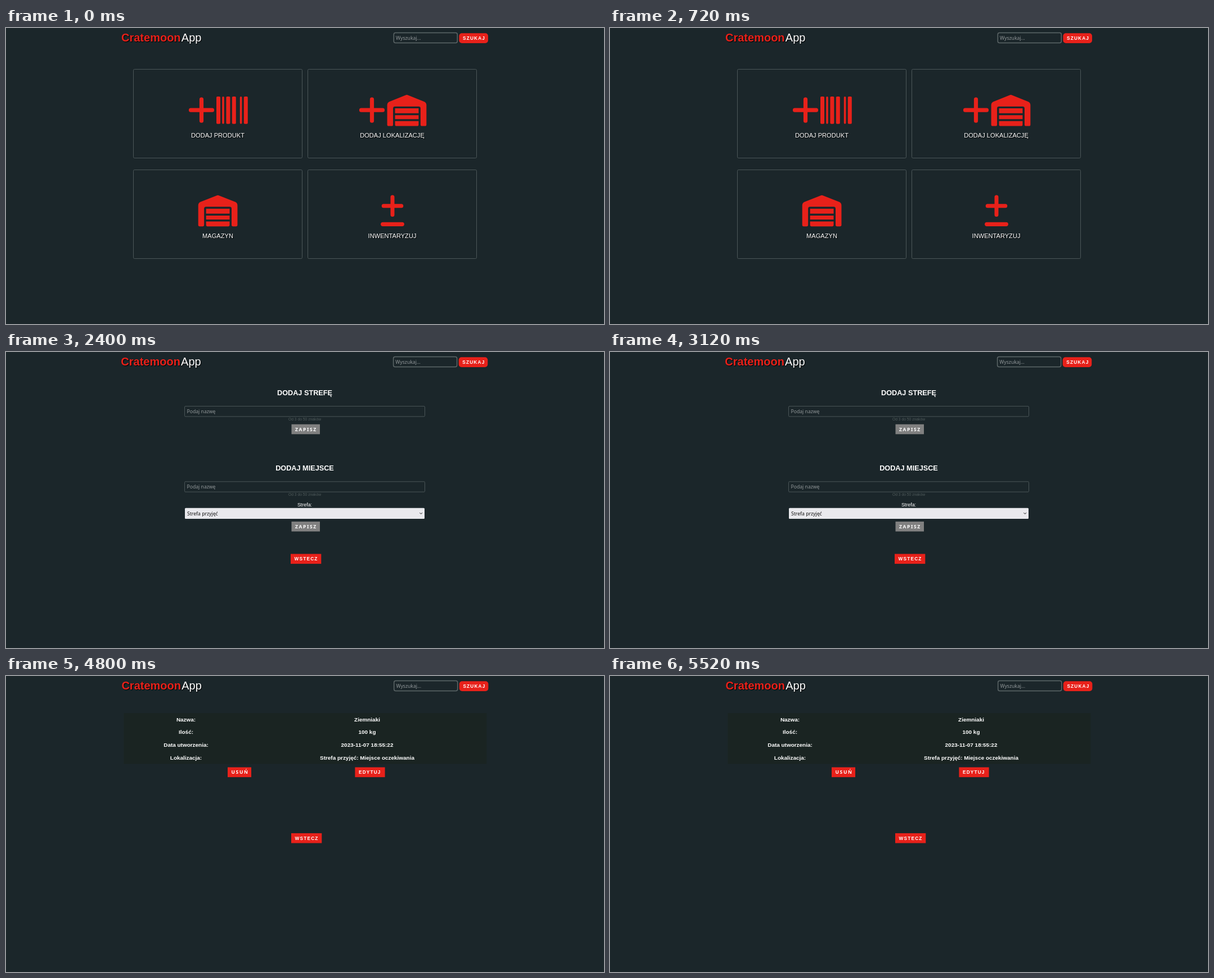
Write an HTML page that moves like this. It is 1063x527 px and loops after 6 s.

```html
<!DOCTYPE html>
<html lang="pl">
<head>
<meta charset="utf-8">
<title>Magazyn</title>
<style>
  html, body { margin: 0; width: 100%; height: 100%; overflow: hidden; background: #1b262a; }
  svg { display: block; width: 1063px; height: 527px; }
  text { font-family: "Liberation Sans", Arial, sans-serif; fill: #fff; white-space: pre; }
  .ui { font-family: "Noto Sans", Tahoma, sans-serif; }
  .bold { font-weight: bold; }
  .shadow { text-shadow: 1px 1px 1px #000; }
  .box { fill: none; stroke: #4b5658; }
</style>
</head>
<body>
<svg id="stage" viewBox="0 0 1063 527"></svg>
<script>
const RED = '#e8211a', GREY = '#808080', FAINT = '#3d4648', HINT = '#505b5c', PLACEHOLDER = '#92989a';
const SCENE_MS = 1200;

const text = (x, y, size, str, { cls = '', fill = '#fff', anchor = 'start', spacing = 0 } = {}) =>
  `<text x="${x}" y="${y}" class="${cls}" text-anchor="${anchor}"
    style="font-size:${size}px;fill:${fill};letter-spacing:${spacing}px">${str}</text>`;
const centered = (x, y, size, str, opts) => text(x, y, size, str, { anchor: 'middle', ...opts });
const heading = (x, y, str, size = 11.1, fill) => centered(x, y, size, str, { cls: 'bold', fill });
const label = (x, y, str, fill) => text(x, y, 8.9, str, { fill });
const uiText = (x, y, str, fill = PLACEHOLDER) => text(x, y, 8.65, str, { cls: 'ui', fill });

const rect = (x, y, w, h, fill, r = 0) =>
  `<rect x="${x}" y="${y}" width="${w}" height="${h}" rx="${r}" fill="${fill}"/>`;
const box = (x, y, w, h, r = 1.5) =>
  `<rect class="box" x="${x}" y="${y}" width="${w}" height="${h}" rx="${r}"/>`;
const field = (x, y, w, str, fill) => box(x, y, w, 18.3) + uiText(x + 4, y + 12.6, str, fill);
const stroke = (d, width, color) =>
  `<path d="${d}" fill="none" stroke="${color}" stroke-width="${width}" stroke-linecap="round"/>`;

function button(x, y, w, str, { fill = RED, color = '#fff', r = 0, ui = false } = {}) {
  return rect(x, y, w, 17.6, fill, r) + text(x + 6.6, y + 11.8, ui ? 8.5 : 8.3, str,
    { cls: ui ? 'ui bold' : 'bold', fill: color, spacing: ui ? 1.6 : 1.15 });
}
const save = (x, y, fill = GREY, color = '#fff') => button(x, y, 50.5, 'ZAPISZ', { fill, color, ui: true });
const back = (x, y) => button(x, y, 54.3, 'WSTECZ');

function select(x, y, w, h, str, fill, ink) {
  const cx = x + w - 6.3, cy = y + h / 2;
  return rect(x, y, w, h, fill, 1.5) + uiText(x + 4, cy + 3.2, str, ink) +
    stroke(`M${cx - 2} ${cy - 1}l2 2l2 -2`, 1, ink);
}

const plus = (x, y, arm, width = 7.2) =>
  stroke(`M${x - arm} ${y}h${2 * arm}M${x} ${y - arm}v${2 * arm}`, width, RED);
const bars = (x, y) => [[0, 7], [10.2, 3.6], [17.4, 7], [27.8, 7], [41.8, 3.6], [48.8, 7]]
  .map(([dx, w]) => rect(x + dx, y, w, 48.7, RED, 1.8)).join('');
const garage = (x, y) => `<path fill="${RED}" transform="translate(${x} ${y}) scale(.109)" d="
  M0 488V171Q0 128 40 112L308 5Q320 0 332 5L600 112Q640 128 640 171V488Q640 512 616 512H568Q544 512 544 488
  V224Q544 192 512 192H128Q96 192 96 224V488Q96 512 72 512H24Q0 512 0 488Z
  M128 224H512V304H128ZM128 336H512V400H128ZM128 432H512V488Q512 512 488 512H152Q128 512 128 488Z"/>`;

const card = (x, y, str, icon) => box(x, y, 300, 158, 2) + icon +
  centered(x + 150, y + 121.5, 11.1, str, { cls: 'shadow' });

const header = (dx, dy) => `<g transform="translate(${dx} ${dy})">` +
  text(205, 24, 20, 'Cratemoon', { cls: 'bold shadow', fill: RED }) +
  text(311.8, 24, 20, 'App', { cls: 'shadow' }) +
  '<rect x="689.3" y="8.6" width="113" height="18" rx="3" fill="none" stroke="#5d6768" stroke-width="1.5"/>' +
  uiText(693, 21, 'Wyszukaj...') +
  button(805.4, 9.3, 51.6, 'SZUKAJ', { r: 5 }) + '</g>';

const home = () => header(0, 0) +
  card(226.5, 73.5, 'DODAJ PRODUKT', plus(347.5, 146.2, 19) + bars(374, 122)) +
  card(536.5, 73.5, 'DODAJ LOKALIZACJĘ', plus(650.5, 146.2, 19) + garage(677.6, 118.7)) +
  card(226.5, 252.5, 'MAGAZYN', garage(341.7, 297.4)) +
  card(536.5, 252.5, 'INWENTARYZUJ',
    plus(687, 316.7, 15.8, 7) + stroke('M669.7 349.3h34.6', 7.2, RED));

const productField = (y, name, str, hint, fill) => label(265, y - 3.3, name) +
  field(264.5, y, 534, str, fill) + text(265, y + 25.9, 6.75, hint, { fill: HINT });

const addProduct = () => header(.1, -1) +
  heading(531.7, 55.3, 'DODAJ PRODUKT') +
  productField(74.2, 'Nazwa:', 'Podaj nazwę', 'Od 3 do 70 znaków') +
  productField(123.3, 'Ilość:', '0', 'Od 0 do 999999', '#fff') +
  rect(784.5, 127.5, 10, 10, '#e6e6e6') +
  stroke('M788 131.2l1.5 -1.5l1.5 1.5M788 134l1.5 1.5l1.5 -1.5', .8, '#777') +
  productField(172.5, 'Jednostka:', 'szt, m3, kg etc.', 'Od 2 do 15 znaków') +
  save(508, 206) +
  heading(531.3, 256.2, 'WYBIERZ LOKALIZACJĘ', 11.1, FAINT) +
  label(332, 284, 'Strefa:', FAINT) + select(362.3, 272, 364.4, 18, '', '#3e4648', '#1b2427') +
  label(332, 333.3, 'Miejsce:', FAINT) +
  select(369, 321.8, 357.7, 17.7, '--Wybierz z listy--', '#3e4648', '#1b2427') +
  save(508, 344, '#2c3639', FAINT);

const placeForm = (y, title) => heading(531, y, title, 12.7) +
  field(317.5, y + 20.1, 427, 'Podaj nazwę') +
  centered(531, y + 45.7, 6.75, 'Od 3 do 50 znaków', { fill: HINT });

const addPlace = () => header(-.7, 0) +
  placeForm(76.5, 'DODAJ STREFĘ') + save(507.5, 128.7) +
  placeForm(210.7, 'DODAJ MIEJSCE') +
  centered(531, 275.4, 8.9, 'Strefa:') +
  select(318, 277.8, 426, 19.2, 'Strefa przyjęć', '#e9e9ed', '#111') +
  save(507.5, 301.9) + back(506, 359.5);

const zoneRow = (y, str) => box(213, y, 639.3, 19.3) + label(218, y + 13, str);

const chooseZone = () => header(1.2, -1.4) +
  heading(532.5, 55, 'WYBIERZ STREFĘ') +
  zoneRow(65.5, 'STREFA PRZYJĘĆ') + zoneRow(90, 'STREFA MAGAZYNOWA NR1') +
  back(507.6, 117.4);

const details = [
  ['Nazwa:', 'Ziemniaki'],
  ['Ilość:', '100 kg'],
  ['Data utworzenia:', '2023-11-07 18:55:22'],
  ['Lokalizacja:', 'Strefa przyjęć: Miejsce oczekiwania'],
];
const product = () => header(.4, 0) + rect(209.5, 66, 645, 90.5, '#1a2422') +
  details.map(([name, value], i) => {
    const y = 80.6 + i * 22.7;
    return heading(320, y, name, 9.95) + heading(642, y, value, 9.95);
  }).join('') +
  button(394, 162.5, 42, 'USUŃ', { ui: true }) + button(620.4, 162.5, 53.2, 'EDYTUJ') +
  back(507, 279.9);

const stage = document.getElementById('stage');
stage.innerHTML = [home, addProduct, addPlace, chooseZone, product]
  .map(scene => `<g visibility="hidden">${scene()}</g>`).join('');
const scenes = [...stage.children];

function render() {
  const current = Math.floor(performance.now() / SCENE_MS) % scenes.length;
  scenes.forEach((g, i) => g.setAttribute('visibility', i === current ? 'visible' : 'hidden'));
  requestAnimationFrame(render);
}
render();
</script>
</body>
</html>
```
